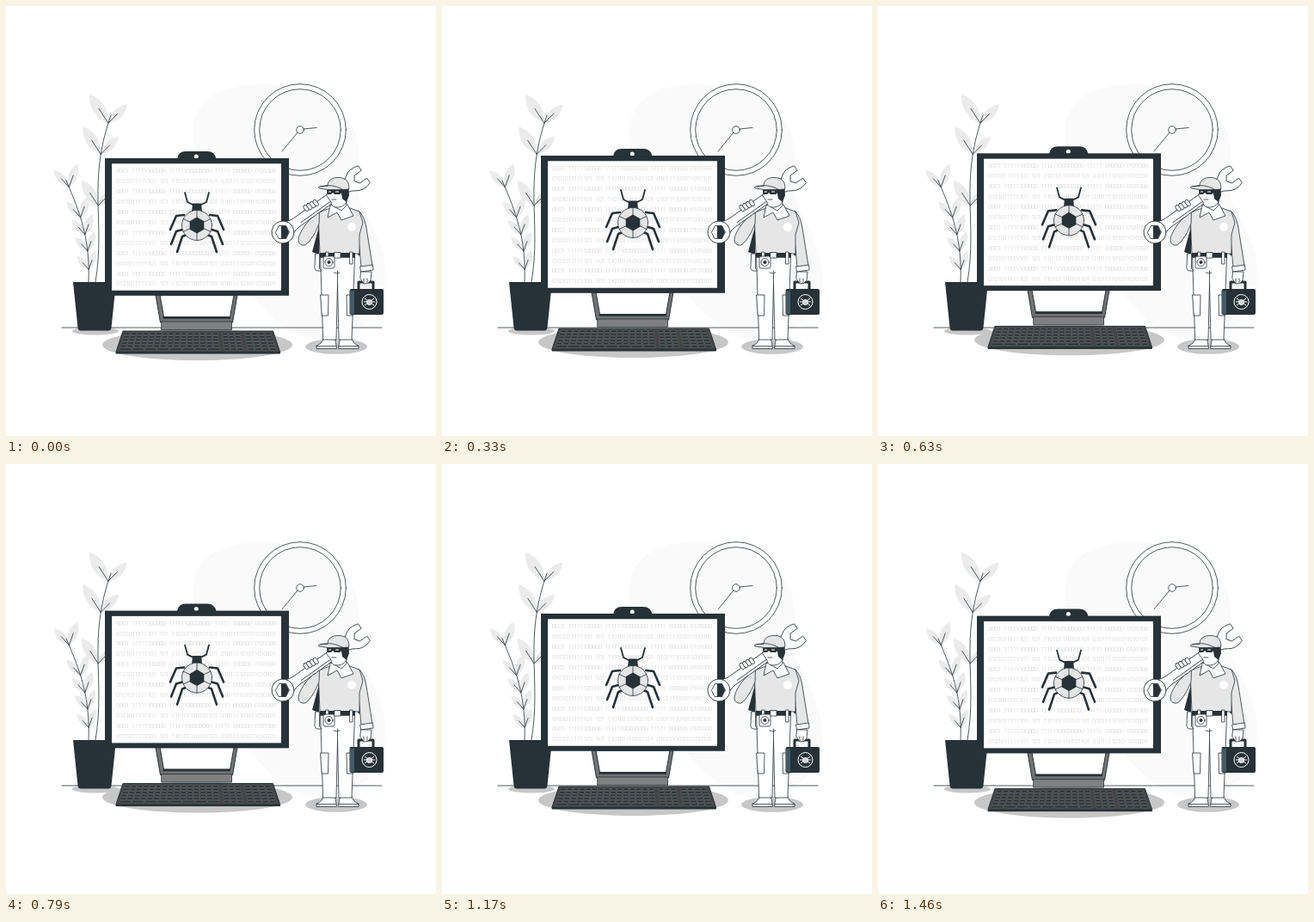
These frames come from a looping animation (500 px wide and 500 px high, 1500 ms). An HTML page:

```html
<!DOCTYPE html>
<html lang="en">
<head>
<meta charset="utf-8">
<title>Bug repair</title>
<style>
  html, body { margin: 0; width: 100%; height: 100%; overflow: hidden; background: #fff; }
  svg { display: block; width: 100%; height: 100%; }
  .ln, .wh, .gr { stroke: #263238; stroke-width: .8; stroke-linecap: round; stroke-linejoin: round; }
  .ln { fill: none; }
  .wh { fill: #fff; }
  .gr { fill: #e6e6e6; }
  .dk { fill: #263238; }
  .sh { fill: #c7c7c7; }
  .leg { fill: none; stroke: #263238; stroke-linejoin: round; stroke-linecap: round; }
  #bits text { font: 300 8px Roboto, sans-serif; letter-spacing: -.87px; word-spacing: 2.5px; fill: #d2d2d2; }
</style>
</head>
<body>
<svg viewBox="0 0 500 500" xmlns="http://www.w3.org/2000/svg">
  <path fill="#fafafa" d="M218 142C220 108 252 90 302 91C354 92 404 118 409 160C412 188 404 206 412 228C424 252 444 284 442 324C440 362 402 388 360 387C312 387 218 280 218 142Z"/>
  <path class="ln" d="M65 374H437"/>

  <!-- clock -->
  <circle class="wh" cx="342" cy="144" r="53.3"/>
  <circle class="ln" cx="342" cy="144" r="47.3" style="fill:#fafafa"/>
  <path class="ln" d="M346 143L361 141.500M339 147L321 169"/>
  <circle class="wh" cx="342" cy="144" r="4.300"/>

  <!-- plant -->
  <ellipse class="sh" cx="104" cy="378" rx="27" ry="4.500"/>
  <g id="plant"></g>
  <path class="dk" d="M78 321H128L122.500 374Q122 377.500 119 377.500H87Q84 377.500 83.500 374Z"/>

  <g id="pc">
    <ellipse class="sh" cx="222.500" cy="394" rx="110.500" ry="18"/>
    <path d="M174 336H269L263.500 368H179.500ZM179 336L183.500 361.500H260.500L265 336Z" fill="#737373" fill-rule="evenodd" stroke="#263238"/>
    <path d="M182.500 362.500H261" stroke="#263238" stroke-width="2.500"/>
    <rect class="ln" x="181" y="367" width="81.500" height="9.500" style="fill:#808080"/>
    <path class="dk" d="M199 178Q200 168.900 209 168.900H234Q243 168.900 244.500 178Z"/>
    <circle cx="221.300" cy="175" r="2.500" fill="#fff"/>
    <rect class="dk" x="115" y="177" width="214" height="159.800"/>
    <rect x="123" y="183.300" width="197" height="147.500" fill="#fff"/>
    <g id="bits"></g>
    <g id="legs"></g>
    <path class="dk" d="M217 229.500H227L228 239H216Z"/>
    <circle class="gr" cx="222" cy="255" r="17.500"/>
    <path class="ln" d="M222 237.500V272.500M206 247.500L238 262.500M206 262.500L238 247.500"/>
    <path class="dk" d="M222 245.500L230.300 250.300V259.800L222 264.500L213.700 259.800V250.300Z"/>
    <path d="M136 378H310.500L318.500 402V404H128V402Z" fill="#454545" stroke="#263238"/>
    <path d="M128 402.800H318.500" stroke="#263238" stroke-width="2"/>
    <g id="keys" fill="#263238" stroke="#808080" stroke-width=".4"></g>
  </g>

  <!-- legs and shoes -->
  <ellipse class="sh" cx="384" cy="396" rx="36" ry="8.800"/>
  <path class="wh" d="M361 398V395Q368 393 370 384H381Q384 390 384.500 398Z"/>
  <path class="wh" d="M410 398V395Q403 393 401 384H390Q387 390 386.500 398Z"/>
  <path class="ln" d="M361 395.500H384M387 395.500H410"/>
  <path class="wh" d="M366 292H405.500L402 388H387L385.500 322L384 388H369Z"/>
  <path class="ln" d="M385.500 322V308M381 310Q385 312 388 310"/>
  <path class="wh" d="M366 336H375L374.500 360H367.500ZM404 336H396L396.500 360H403Z"/>

  <!-- arms and shirt -->
  <path class="dk" d="M364 256V289L356 286ZM411 240L419 258L411 291L406 285Z"/>
  <path class="gr" d="M411 239Q417 245 419 258L426 302L413 304L410 270Z"/>
  <path class="wh" d="M412 303L426.500 301L427 307L413 309Z"/>
  <path class="gr" d="M374 236L397 234L411 239L415 252L411 266V288H365L363 241Z"/>
  <path class="gr" d="M364 240C354 245 340 262 340 273Q341 279 348 278C354 274 361 262 364 253Z"/>
  <path class="wh" d="M377 232L374 246L385 240L390 249L404 244L397 231Z"/>
  <circle cx="402" cy="257" r="5" fill="#fff"/>

  <!-- belt -->
  <path class="dk" d="M365 287H406V292.500H365Z"/>
  <path class="wh" d="M372 286H375V293.500H372ZM382 286.500H389V293H382ZM400 286H403V300H400Z"/>
  <path class="wh" d="M360 288H364.500V305L367 308H362Q358 307 359 302Z"/>
  <rect class="wh" x="369" y="291" width="13" height="14" rx="2"/>
  <circle class="wh" cx="375.500" cy="298" r="4.500"/>
  <circle class="dk" cx="375.500" cy="298" r="2"/>

  <!-- wrench -->
  <g transform="translate(322 263) rotate(-35.500)">
    <path class="wh" d="M10-8Q14-6 20-6H88Q94-7 97-10Q105-16 116-12V-5.500H106L102 0L106 5.500H116V12Q105 16 97 10Q94 7 88 6H20Q14 6 10 8Z"/>
    <path class="ln" d="M24 3H80"/>
    <circle class="wh" r="13"/>
    <g id="fingers"></g>
  </g>
  <path class="wh" d="M313.500 263L317.500 255.500H325.500L329.500 263L325.500 270.500H317.500Z"/>
  <path class="dk" d="M320 255.500H325.500L329 263L325.500 270.500H320Z"/>

  <!-- head -->
  <path class="wh" d="M375 212H394L396 232L390 238L383 234Q378 233 378 228L373 221Z"/>
  <path class="dk" d="M389 212H398.500L399 220L396 228L391 224ZM373 214H391V216.500L388 219H382L380 217L378 219H374Z"/>
  <path d="M375 216H378M383 216H387" stroke="#fff"/>
  <path class="ln" d="M379 225H384M396 228Q392 235 383 234"/>
  <path class="gr" d="M374 209C374 202 380 199 388 199.500C396 200 400 206 398.500 213L391 213.500H374L364 212Q362 210 366 209.500Z"/>
  <path class="ln" d="M366 210Q378 206 391 213"/>

  <!-- toolbox -->
  <path d="M410 330V321H427V330" fill="none" stroke="#263238" stroke-width="3" stroke-linejoin="round"/>
  <path class="wh" d="M413 309H425L424 319Q421 324 416 323L412 317Z"/>
  <path class="ln" d="M416 317V322M420 317V322"/>
  <rect class="dk" x="399.500" y="329" width="39.500" height="30" rx="2"/>
  <path d="M400 331H405V358H400Z" fill="#455a64"/>
  <g stroke="#fff" fill="none">
    <circle cx="422.500" cy="344" r="8.500"/>
    <path d="M417 340L428 348M417 348L428 340M416 344H429"/>
    <circle cx="422.500" cy="344.500" r="3" fill="#cfd3d5"/>
  </g>
</svg>
<script>
const NS = 'http://www.w3.org/2000/svg';
const byId = id => document.getElementById(id);

function add(parent, tag, attrs, text) {
  const el = document.createElementNS(NS, tag);
  for (const k in attrs) el.setAttribute(k, attrs[k]);
  if (text) el.textContent = text;
  byId(parent).appendChild(el);
}

// Leaf from its base to a tip offset by (dx, dy), with a vein.
function leaf([x, y], dx, dy) {
  const mx = x + dx * .5, my = y + dy * .5, b = .36;
  const tip = `${x + dx} ${y + dy}`;
  add('plant', 'path', { fill: '#ebebeb', d: `M${x} ${y}Q${mx - dy * b} ${my + dx * b} ${tip}Q${mx + dy * b} ${my - dx * b} ${x} ${y}Z` });
  add('plant', 'path', { class: 'ln', d: `M${x} ${y}L${x + dx * .5} ${y + dy * .5}` });
}

// A cubic stem with a pair of leaves at each given position along it.
function stem(pts, spots, left, right) {
  const at = t => [0, 1].map(i => {
    const [a, b, c, d] = pts.map(p => p[i]), u = 1 - t;
    return u * u * u * a + 3 * u * u * t * b + 3 * u * t * t * c + t * t * t * d;
  });
  for (const t of spots) {
    const k = .75 + .25 * t;
    leaf(at(t), left[0] * k, left[1] * k);
    leaf(at(t), right[0] * k, right[1] * k);
  }
  const [a, b, c, d] = pts;
  add('plant', 'path', { class: 'ln', d: `M${a}C${b} ${c} ${d}` });
}
stem([[104, 321], [116, 250], [94, 205], [122, 127]], [.47, .79, .96], [-22, -34], [22, -22]);
stem([[96, 321], [98, 270], [86, 240], [70, 203]], [.1, .26, .42, .6, .93], [-18, -20], [10, -28]);

const lines = [
  '0001 11111100000 11111100000000 11111 000000 0101000',
  '0101011111101 101 110101110101101 010111101011010101'
];
for (let i = 0; i < 12; i++) add('bits', 'text', { x: 128, y: 194 + i * 11.95 }, lines[i % 2]);

// One antenna and three legs, mirrored about the bug's axis.
function limb(width, ...pts) {
  for (const side of [-1, 1]) {
    const d = 'M' + pts.map(([x, y]) => `${222 + side * x} ${y}`).join('L');
    add('legs', 'path', { class: 'leg', 'stroke-width': width, d });
  }
}
limb(1.8, [3, 232], [11, 228], [14, 217]);
limb(2.6, [15, 243], [24, 244], [31, 260]);
limb(2.6, [17, 260], [24, 262], [30, 277]);
limb(2.6, [12, 266], [17, 268], [23, 286]);

// Key rows widen towards the front edge.
function keyRow(row, from, to, count) {
  const y = 380 + row * 3.55, left = 138 - row * 1.2, width = 171 + row * 2.4;
  const step = width * (to - from) / count;
  for (let i = 0; i < count; i++)
    add('keys', 'rect', { x: left + width * from + i * step, y, width: step - 1, height: 2.5, rx: .4 });
}
for (let r = 0; r < 6; r++) {
  keyRow(r, 0, .64, r === 5 ? 8 : 15);
  keyRow(r, .665, .79, 3);
  keyRow(r, .815, 1, 4);
}

for (let i = 0; i < 4; i++)
  add('fingers', 'rect', { class: 'wh', x: 36 + i * 4.2, y: -11 + i * .5, width: 4.4, height: 8, rx: 2.2 });

const LOOP = 1500, STEPS = 36, RISE = 6.8;
const pc = byId('pc');

// Linear rise and fall, in 24 steps a second.
function draw(ms) {
  const step = Math.floor(ms / LOOP * STEPS + .1) % STEPS;
  const y = -RISE * (1 - Math.abs(1 - 2 * step / STEPS));
  pc.setAttribute('transform', `translate(0 ${y.toFixed(3)})`);
}

let start;
function tick(now) {
  start ??= now;
  draw(now - start);
  requestAnimationFrame(tick);
}
draw(0);
requestAnimationFrame(tick);
</script>
</body>
</html>
```
